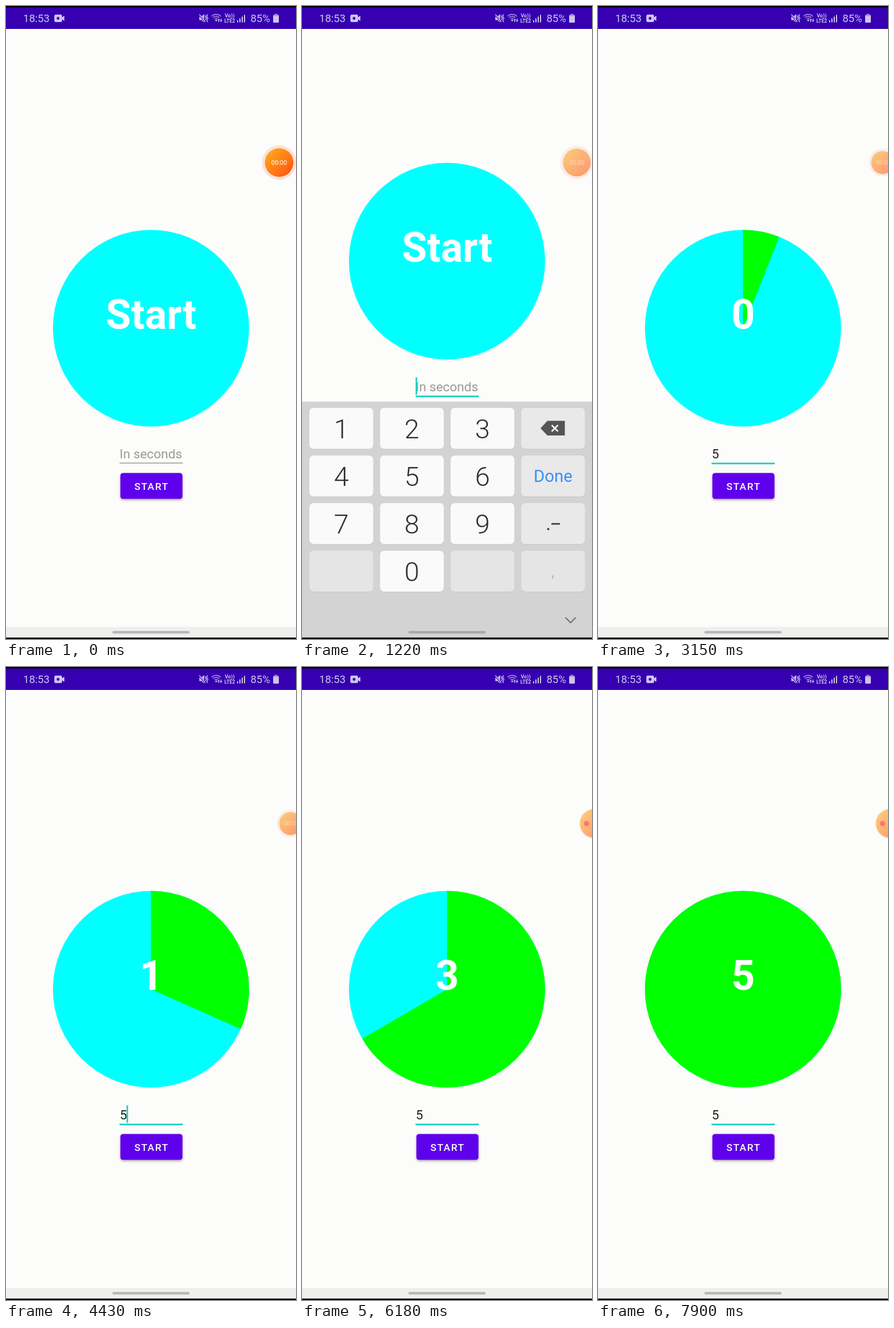
An HTML page with a canvas for the animation above (8000 ms loop, 507 by 1104 pixels).

```html
<!DOCTYPE html>
<html lang="en">
<head>
<meta charset="utf-8">
<title>Countdown pie</title>
<style>
  html, body { margin: 0; width: 100%; height: 100%; overflow: hidden; background: #fcfcfb; }
  canvas { display: block; }
</style>
</head>
<body>
<canvas id="stage" width="507" height="1104"></canvas>
<script>
const ctx = document.getElementById('stage').getContext('2d');
const W = 507, H = 1104, LOOP = 8000;
const FONT = 'Roboto, "Open Sans", sans-serif';
const TEAL = '#19cdbd', STATUS_INK = '#cfc4ec';

// Event times in ms
const FOCUS = 90, KEYS_UP = 450, TYPED = 1330, DONE = 1610, KEYS_DOWN = 1690;
const PRESS = 2760, RUN = 2850, RUN_LENGTH = 5000;
const DIM = 900, SHRINK = 1180, TICK = 1650, TUCK = 4740;
const PAN = 117, KEYS_TOP = 690;

const clamp = v => Math.max(0, Math.min(1, v));
const part = (t, from, length) => clamp((t - from) / length);
const mix = (a, b, k) => a + (b - a) * k;
const easeOut = k => 1 - (1 - k) ** 3;
const smooth = k => k * k * (3 - 2 * k);

function text(str, x, y, size, color, weight = 400, align = 'left', spacing = 0) {
  ctx.font = `${weight} ${size}px ${FONT}`;
  ctx.textAlign = align;
  ctx.letterSpacing = spacing + 'px';
  ctx.fillStyle = color;
  ctx.fillText(str, x, y);
}

function rect(x, y, w, h, color, radius = 0) {
  ctx.fillStyle = color;
  ctx.beginPath();
  ctx.roundRect(x, y, w, h, radius);
  ctx.fill();
}

function disc(x, y, r, color) {
  ctx.fillStyle = color;
  ctx.beginPath();
  ctx.arc(x, y, r, 0, Math.PI * 2);
  ctx.fill();
}

function poly(points, color) {
  ctx.fillStyle = color;
  ctx.beginPath();
  points.forEach(p => ctx.lineTo(...p));
  ctx.closePath();
  ctx.fill();
}

function line(points, color, width) {
  ctx.strokeStyle = color;
  ctx.lineWidth = width;
  ctx.beginPath();
  points.forEach(p => ctx.lineTo(...p));
  ctx.stroke();
}

function drawStatusBar() {
  const bar = '#3600b0', ink = STATUS_INK;
  rect(0, 0, W, 40, bar);
  rect(0, 0, W, 2.5, '#000');
  text('18:53', 30, 28, 18.5, ink);

  // Camera
  rect(84.5, 15, 13.5, 13, ink, 2.5);
  poly([[97, 20.5], [102, 17], [102, 26], [97, 22.5]], ink);
  disc(91, 21.5, 2.4, bar);

  // Muted speaker
  poly([[338, 18.5], [341.5, 18.5], [346.5, 14], [346.5, 29], [341.5, 24.5], [338, 24.5]], ink);
  line([[337.5, 14.5], [348.5, 28]], bar, 3);
  line([[338, 14.5], [348.5, 27.5]], ink, 1.4);
  line([[349.5, 16], [348.5, 18.5], [350.5, 21], [348.5, 24]], ink, 1.4);
  line([[352.5, 14.5], [351, 18], [353, 21.5], [351, 25], [352.5, 28]], ink, 1.4);

  // Wireless
  ctx.strokeStyle = '#a996dc';
  ctx.lineWidth = 1.5;
  for (const r of [4, 7.5, 11]) {
    ctx.beginPath();
    ctx.arc(367.5, 25.5, r, -Math.PI * 0.76, -Math.PI * 0.24);
    ctx.stroke();
  }
  disc(367.5, 25, 1.6, ink);
  poly([[370, 25], [372, 22], [374, 25]], ink);
  rect(371.3, 25, 1.4, 3, ink);
  poly([[374, 25], [376, 28], [378, 25]], ink);
  rect(375.3, 22, 1.4, 3, ink);

  text('Vo))', 391, 20, 9, ink, 700, 'center');
  text('LTE2', 391, 29, 8.5, ink, 700, 'center');
  for (let i = 0; i < 4; i++) rect(404 + i * 4, 25 - i * 3.2, 2, 3.5 + i * 3.2, ink);
  text('85%', 427.5, 28, 18.4, ink);
  rect(469.5, 13.5, 4.5, 3, '#8e76d0');
  rect(467, 15.5, 10, 13.5, ink, 1.5);
  rect(467, 15.5, 10, 2, '#a592da', 1);
}

function drawPie(t) {
  const x = 253.5, y = 562, r = 171.5, top = -Math.PI / 2;
  const gone = part(t, RUN, RUN_LENGTH);
  disc(x, y, r, '#00ffff');
  if (gone >= 1) {
    disc(x, y, r, '#00ff00');
  } else if (gone > 0) {
    ctx.fillStyle = '#00ff00';
    ctx.beginPath();
    ctx.moveTo(x, y);
    ctx.arc(x, y, r, top, top + gone * Math.PI * 2);
    ctx.fill();
  }
  const label = t < RUN ? 'Start' : String(Math.floor(gone * RUN_LENGTH / 1000));
  text(label, x + 0.3, 562.5, 71.5, '#fff', 700, 'center');
}

function drawField(t) {
  const focused = t >= FOCUS, typed = t >= TYPED;
  if (typed) text('5', 199, 788.5, 22.4, '#1c1c1c');
  else text('In seconds', 198.5, 788.5, 22.6, '#9a9a98');

  if (!focused) {
    rect(198.5, 796.6, 110.5, 1.2, '#85857c');
    return;
  }
  rect(198.5, 796.6, 110.5, 2.6, TEAL);
  const since = t - (typed ? TYPED : FOCUS);
  if (since % 1000 < 500) rect(typed ? 210.8 : 198.6, 764.5, 2.6, 30.5, TEAL);
}

function drawButton(t) {
  const held = part(t, PRESS, 90) * (1 - part(t, RUN + 30, 200));
  ctx.save();
  ctx.shadowColor = 'rgba(0,0,0,0.35)';
  ctx.shadowBlur = 4 + 5 * held;
  ctx.shadowOffsetY = 2 + 2 * held;
  rect(200, 814.5, 108.5, 45, '#5f00ec', 4.5);
  ctx.restore();
  if (held > 0) rect(200, 814.5, 108.5, 45, `rgba(255,255,255,${0.2 * held})`, 4.5);
  text('START', 224.6, 844, 17.3, '#fff', 500, 'left', 1.54);
}

function drawKeyboard(t, shown) {
  ctx.save();
  ctx.translate(0, (1 - shown) * (H - KEYS_TOP));
  rect(0, KEYS_TOP, W, H - KEYS_TOP + 2, '#d3d3d3');
  const labels = ['1', '2', '3', '', '4', '5', '6', '', '7', '8', '9', '', '', '0', '', ''];
  labels.forEach((label, i) => {
    const col = i % 4, row = Math.floor(i / 4);
    const x = 13 + col * 123.4, y = 701 + row * 83;
    const down = (i === 5 && t > TYPED - 50 && t < TYPED + 60) ||
                 (i === 7 && t > DONE && t < DONE + 90);
    const face = down ? '#c4c4c6' : label ? '#fafafa' : row === 3 ? '#e5e5e5' : '#e9e9ea';
    rect(x, y + 1, 111.5, 71.5, '#c4c4c4', 7);
    rect(x, y, 111.5, 71.5, face, 7);
    if (label) text(label, x + 55.7, y + 52.5, 47, '#303030', 300, 'center');
  });

  poly([[417, 736.5], [429, 723.5], [459.5, 723.5], [459.5, 749], [429, 749]], '#555');
  line([[436.5, 731], [447.5, 742]], '#f2f2f2', 2.6);
  line([[447.5, 731], [436.5, 742]], '#f2f2f2', 2.6);
  text('Done', 439, 829.5, 29.4, '#3b8ff2', 400, 'center');
  disc(430.5, 912.3, 2, '#404040');
  rect(436, 901.8, 15, 2.8, '#404040');
  text(',', 438.5, 996, 25, '#b4b4b4', 400, 'center');
  line([[460.5, 1066.5], [469.5, 1075.5], [478.5, 1066.5]], '#707070', 2.2);
  ctx.restore();
}

function drawBubble(t) {
  const shrink = part(t, SHRINK, 280);
  const tuck = smooth(part(t, TUCK, 260));
  const x = mix(mix(477.5, 497.5, shrink), 511, tuck), y = 273;
  const r = mix(mix(25, 20, shrink), 25, tuck);
  ctx.save();
  ctx.globalAlpha = mix(1, 0.55, part(t, DIM, 220));
  disc(x, y, r * mix(1.2, 1.07, tuck), '#fae2d8');
  const fill = ctx.createLinearGradient(x - r * 0.7, y - r * 0.7, x + r * 0.7, y + r * 0.7);
  fill.addColorStop(0, '#ffa41c');
  fill.addColorStop(1, '#ff5c10');
  disc(x, y, r, fill);
  if (tuck < 0.5) {
    const seconds = Math.max(0, Math.floor((t - TICK) / 1000) + 1);
    text('00:0' + seconds, x, y + r * 0.155, r * 0.44, '#fff', 400, 'center');
  }
  ctx.restore();
  if (tuck >= 0.5) disc(x - 13.5, y, 4.6, '#ff7474');
}

function draw(t) {
  const opening = easeOut(part(t, KEYS_UP, 300));
  const closing = smooth(part(t, KEYS_DOWN, 270));
  const shown = opening * (1 - closing);

  rect(0, 0, W, H, '#fcfcfb');
  ctx.save();
  ctx.translate(0, -PAN * shown);
  drawPie(t);
  drawField(t);
  drawButton(t);
  ctx.restore();

  rect(0, 1083, W, 19, '#efefee');
  if (shown > 0) drawKeyboard(t, shown);
  rect(186, 1090, 135, 4.6, shown > 0.5 ? '#a9a9a9' : '#b8b8b8', 2.3);
  rect(0, 1101.5, W, 2.5, '#000');
  drawStatusBar();
  drawBubble(t);
}

const start = performance.now();
function frame() {
  draw((performance.now() - start) % LOOP);
  requestAnimationFrame(frame);
}
frame();
</script>
</body>
</html>
```
